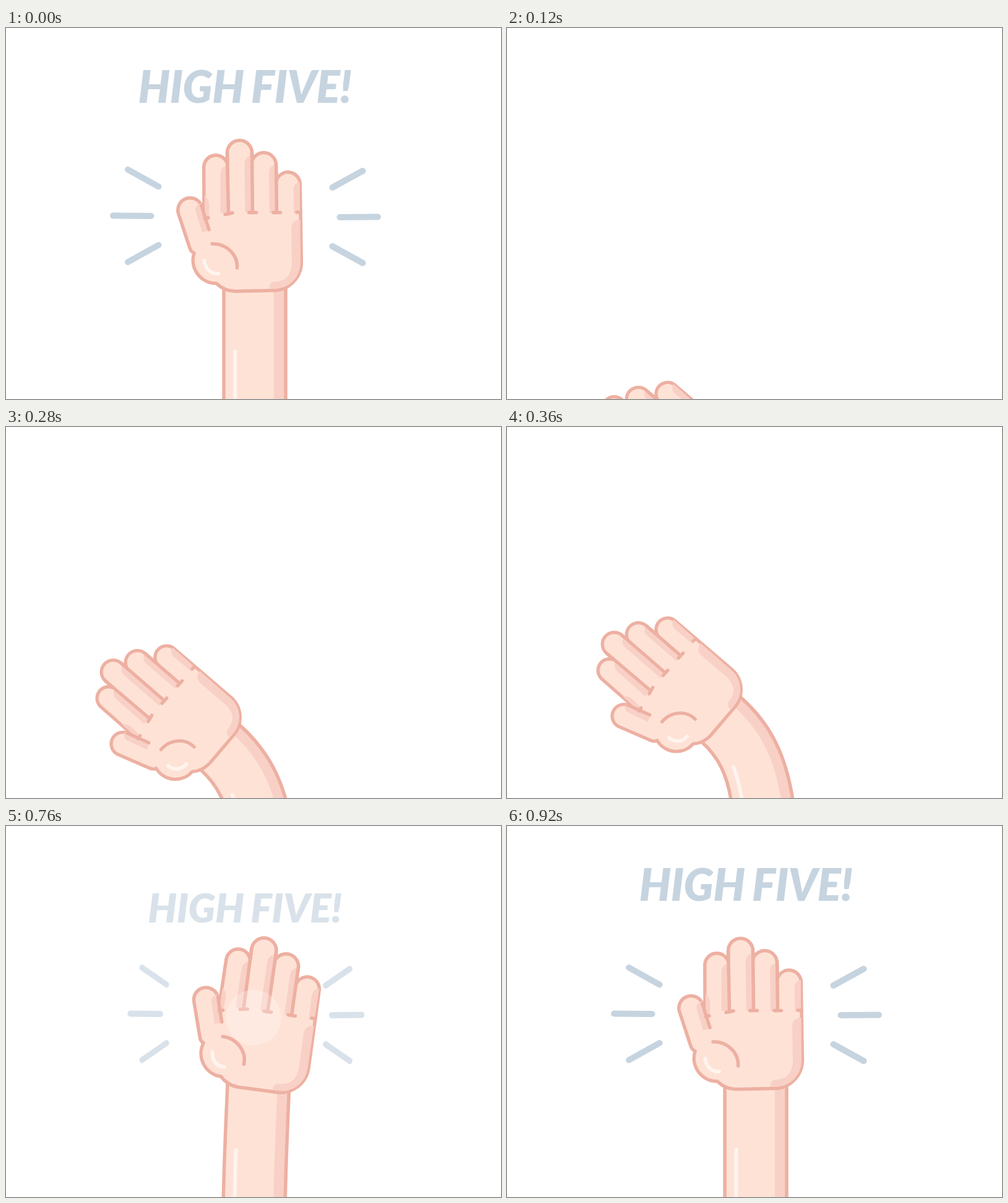
Recreate the animation shown at these times as an HTML page. Size 800 by 600 pixels, loop 1280 ms.

```html
<!DOCTYPE html>
<html lang="en">
<head>
<meta charset="utf-8">
<title>High five</title>
<style>
  html, body { margin: 0; width: 100%; height: 100%; overflow: hidden; background: #fff; }
  svg { display: block; width: 800px; height: 600px; }
  .skin { fill: #fee2d6; }
  .shade { fill: #f8d0c6; }
  .line { stroke: #edb0a2; stroke-width: 5.5; stroke-linecap: round; stroke-linejoin: round; }
  .open { fill: none; }
  .shine { fill: none; stroke: #fff4ee; stroke-width: 6; stroke-linecap: round; }
  .ray { fill: none; stroke: #c6d4e0; stroke-width: 10; stroke-linecap: round; }
  text { font: italic 900 71.5px Lato, sans-serif; letter-spacing: -0.5px; word-spacing: -2.5px; fill: #c6d4e0; text-anchor: middle; }
</style>
</head>
<body>
<svg viewBox="0 0 800 600">
  <g id="cheer">
    <text id="title">HIGH FIVE!</text>
    <path id="left" class="ray" d="M197 229L246.500 256.500M173 303.500L234.500 304M197 378.500L246.500 351"/>
    <path id="right" class="ray" d="M527.500 258L576.500 231M539.500 306L601 305.500M527.500 353L576.500 380"/>
  </g>
  <g id="body">
    <path id="arm" class="skin"/>
    <path id="armShade" class="shade"/>
    <path id="armShine" class="shine"/>
    <path id="armLine" class="line open"/>
    <g id="hand">
      <path class="skin line" d="M340 413A37.500 37.500 0 0 1 304 364Q299 362 297 356L278.300 299A19.700 19.700 0 0 1 315.700 287L320 300L319.700 225A19.400 19.400 0 0 1 357.800 220L357.500 202A20 20 0 0 1 397.500 201.500L397.600 215A20 20 0 0 1 436.500 222L437 247A19.600 19.600 0 0 1 475.300 254L477.400 379A46 46 0 0 1 432 424.500L370 425.700Q352 425 340 413Z"/>
      <path class="shade" d="M357 222Q346.500 226 346.500 238V299H358ZM397 206Q385.500 208 385.500 220L386.500 298H397ZM436 221Q425 223 425 235L426 299H436ZM475 249Q464.500 251 464.500 262L465.500 300H475Z"/>
      <path class="shade" d="M315 283Q304 288 307 297L317 331L328 327ZM321 271Q328.500 277 328.500 287L327.500 306L321 303Z"/>
      <path class="shade" d="M475.500 309.500Q461 311 461 325L462 380Q461 410 433 410.500Q425.500 411 425.500 422H434A42 42 0 0 0 476 380Z"/>
      <path class="line open" d="M315.700 287L328 326M321 308L327 307M357.500 202L359.500 298M354 301.500L366 299M397.500 202L398.500 298M392.500 298.500H404.500M436.500 220L437.500 298M432 298.500H443.500M470 298H476M333 349C356 348 375 367 373.500 388"/>
      <path class="shine" d="M320.500 376C321 388 330 398 343 397"/>
    </g>
  </g>
  <circle id="flash" cx="400" cy="310" fill="#fff"/>
</svg>
<script>
const LOOP = 1280, STEP = 40, FLOOR = 603;
const $ = id => document.getElementById(id);
const put = (id, attrs) => { for (const k in attrs) $(id).setAttribute(k, attrs[k]); };
const mix = (a, b, w) => a.map((v, i) => v + (b[i] - v) * w);
const span = (t, from, to) => Math.min(1, Math.max(0, (t - from) / (to - from)));
const smooth = s => s * s * (3 - 2 * s);

// turn, scale, centre x, centre y, wrist angle, base shift, base slope, shine x, shine y
const BENT = [-48.4, .958, 206.5, 381.3, -48.4, 10, .16, 366, 550];
const SWING = [-23.3, .964, 283, 307.2, -23.3, 5, .06, 367.5, 540];
const OVER = [8.75, 1.004, 409.2, 247.5, 2.5, -.7, -.02, 371.5, 524];
const REST = [0, 1, 377, 248.5, 0, 0, 0, 370.3, 523];

function poseAt(t) {
  if (t < 680) return BENT;
  if (t >= 760) return mix(OVER, REST, smooth(span(t, 760, 920)));
  const v = span(t, 680, 760);
  const pose = mix(SWING, OVER, 1 - (1 - v) ** 1.4);
  pose[3] -= 8 * Math.sin(Math.PI * v);
  return pose;
}

function drawBody([turn, size, cx, cy, bend, shift, slope, sx, sy]) {
  const a = turn * Math.PI / 180, b = bend * Math.PI / 180;
  const wrist = x => {
    const dx = (x - 377) * size, dy = 171.5 * size;
    return [cx + dx * Math.cos(a) - dy * Math.sin(a), cy + dx * Math.sin(a) + dy * Math.cos(a)];
  };
  const edge = x => {
    const [x0, y0] = wrist(x), x3 = x + shift;
    const k = .37 * Math.hypot(x3 - x0, FLOOR - y0);
    return [[x0, y0], [x0 - k * Math.sin(b), y0 + k * Math.cos(b)], [x3 - k * slope, FLOOR - k], [x3, FLOOR]];
  };
  const curve = ([p, ...rest]) => `${p}C${rest.join(" ")}`;
  const band = (p, q) => `M${curve(p)}L${curve([...q].reverse())}Z`;
  const left = edge(352), inner = edge(433), right = edge(452);
  const endX = 370.3 + shift;
  put("arm", { d: band(left, right) });
  put("armShade", { d: band(inner, right) });
  put("armLine", { d: `M${curve(left)}M${curve(right)}` });
  put("armShine", { d: `M${sx} ${sy}Q${endX - slope * 28} ${(sy + FLOOR) / 2} ${endX} ${FLOOR + 4}` });
  put("hand", { transform: `translate(${cx} ${cy}) rotate(${turn}) scale(${size}) translate(-377 -248.5)` });
}

// Rays grow sideways from a fixed inner point.
const stretch = (x, s) => ({ transform: `translate(${x} 0) scale(${s} 1) translate(${-x} 0)` });

function drawCheer(t) {
  const u = span(t, 680, 920), left = (1 - u) ** 4;
  put("cheer", { opacity: span(t, 680, 800) });
  put("title", { transform: `translate(386 ${95 + 190 * left}) scale(${1 - .46 * left}) translate(0 25.5)` });
  put("left", stretch(312, 1 - left));
  put("right", stretch(471, 1 - left));
  put("flash", { r: 135 * u, opacity: Math.max(0, 1 - 2.25 * u) });
}

function draw(time) {
  // The first step still shows the end of the previous loop.
  const t = time < STEP ? LOOP : time;
  const drop = 316 * (1 - smooth(span(t, 40, 360))) ** 1.05;
  drawBody(poseAt(t));
  put("body", { transform: `translate(0 ${drop})` });
  drawCheer(t);
}

const start = performance.now();
function tick(now) {
  const t = Math.max(0, now - start) % LOOP;
  draw(Math.floor(t / STEP) * STEP);
  requestAnimationFrame(tick);
}
draw(0);
requestAnimationFrame(tick);
</script>
</body>
</html>
```
